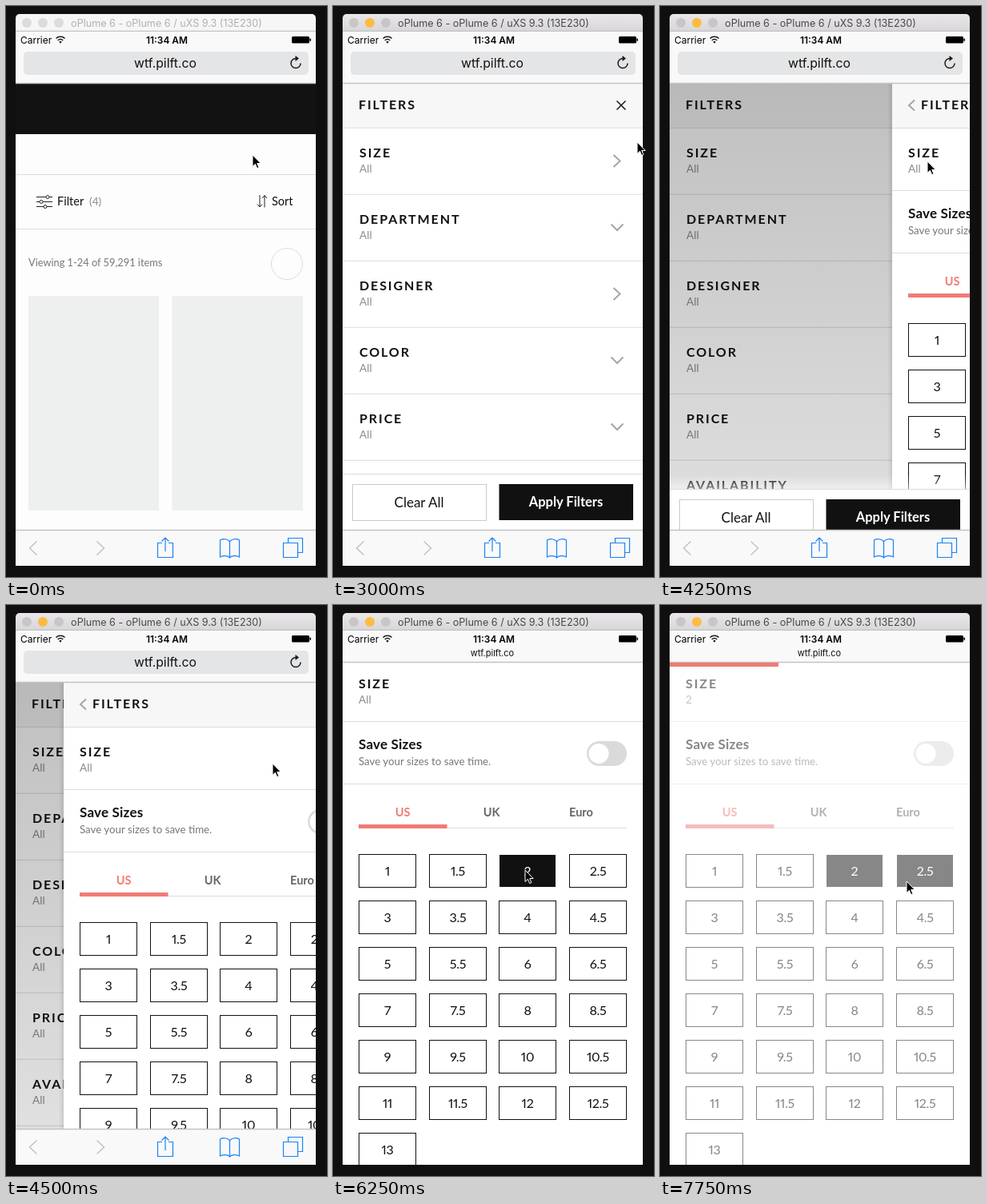
Animation, 401 px wide and 713 px high, one loop 8 s. Source, as an HTML page:

```html
<!DOCTYPE html>
<html lang="en">
<head>
<meta charset="utf-8">
<title>Mobile filter flow</title>
<style>
  html, body { margin: 0; width: 100%; height: 100%; overflow: hidden; background: #100f0f; }
  svg { display: block; width: 100vw; height: 100vh; }
  text { font: 14.5px Lato, "Open Sans", sans-serif; fill: #111; white-space: pre; }
  .ui { font-family: Inter, Roboto, sans-serif; }
  .mid { text-anchor: middle; }
  .title { font-size: 12.6px; }
  .status { font-size: 12px; fill: #000; }
  .clock { font-size: 11.9px; font-weight: 600; }
  .head { font-size: 16px; font-weight: 700; letter-spacing: 1.9px; }
  .value { font-size: 13.6px; fill: #8a8a8a; }
  .count { font-size: 12.8px; fill: #777; }
  .strong { font-size: 17px; font-weight: 700; letter-spacing: .2px; }
  .note { font-size: 13.3px; fill: #777; }
  .tab { font-weight: 700; fill: #666; }
  .cell { font-size: 16px; font-variant-numeric: proportional-nums; letter-spacing: -.3px; }
  .button { font-size: 17px; }
  .apply { font-size: 16.5px; font-weight: 700; fill: #fff; }
  .line { fill: none; stroke-linejoin: miter; }
  .rule { stroke: #dcdcdc; }
  .soft { stroke: #a6a6a6; stroke-width: 2; }
  .dark { stroke: #1a1a1a; stroke-width: 1.5; }
  .thin { stroke: #222; stroke-width: 1; }
  .blue { stroke: #1b82f6; stroke-width: 1.2; }
  .off { stroke: #c3c3c5; stroke-width: 1.5; }
  .picked rect { fill: #111; stroke: #fff; }
  .picked text { fill: #fff; }
</style>
</head>
<body>
<svg id="stage" viewBox="0 0 401 713"></svg>
<script>
const CORAL = '#f07b76';
const LOOP = 8000, TICK = 250, SCROLL_END = 85;

const text = (x, y, str, cls = '', attrs = '') =>
  `<text x="${x}" y="${y}" class="${cls}" ${attrs}>${str}</text>`;
const path = (d, cls, attrs = '') => `<path d="${d}" class="line ${cls}" ${attrs}/>`;
const rect = (x, y, w, h, fill, attrs = '') =>
  `<rect x="${x}" y="${y}" width="${w}" height="${h}" fill="${fill}" ${attrs}/>`;
const rule = (y, x1 = 12, x2 = 387) => path(`M${x1} ${y}H${x2}`, 'rule');
const group = (id, inner, attrs = '') => `<g id="${id}" ${attrs}>${inner}</g>`;
const closeIcon = path('M354.5 118.5l11 11m0-11l-11 11', 'dark');

function listing() {
  const slider = (y, x) =>
    path(`M38 ${y}H${x - 2}M${x + 2} ${y}H58`, 'thin') +
    `<circle cx="${x}" cy="${y}" r="2" class="line thin"/>`;
  return rect(12, 96, 375, 64, '#121212') +
    rect(12, 160, 375, 540, '#fdfdfd') +
    rule(210.5) + rule(278.5) +
    slider(238.5, 52) + slider(244.5, 44) + slider(250.5, 49) +
    text(64, 249, 'Filter') + text(104, 249, '(4)', 'value') +
    path('M317 236v15m-3-3.5l3 3.5 3-3.5M323 251.5v-15m-3 3.5l3-3.5 3 3.5', 'thin') +
    text(332, 249, 'Sort') +
    text(28, 324.5, 'Viewing 1-24 of 59,291 items', 'count') +
    '<circle cx="351" cy="322" r="19.5" class="line rule"/>' +
    rect(28, 362, 163, 268, '#eeefef') + rect(207.5, 362, 163.5, 268, '#eeefef');
}

function filterSheet() {
  const names = ['SIZE', 'DEPARTMENT', 'DESIGNER', 'COLOR', 'PRICE', 'AVAILABILITY', 'SALE'];
  const rows = names.map((name, i) => {
    const y = 152 + 83 * i;
    const chevron = i === 0 || i === 2
      ? `M350.5 ${y + 34}l8 7.5-8 7.5`
      : `M347.5 ${y + 37.5}l7.5 7.5 7.5-7.5`;
    return rule(y + .25) + text(33, y + 36.5, name, 'head') +
      text(33, y + 55.5, 'All', 'value') + path(chevron, 'soft');
  }).join('');
  return rect(12, 96, 375, 640, '#fff') + rect(12, 96, 375, 56, '#f7f7f7') +
    text(32, 129, 'FILTERS', 'head') + closeIcon + rows;
}

function sizePanel() {
  const cells = Array.from({ length: 25 }, (_, i) => {
    const x = 32.5 + Math.round(87.7 * (i % 4)), y = 396.5 + 58 * Math.floor(i / 4);
    return group('cell' + i,
      rect(x, y, 71, 41, '#fff', 'stroke="#111"') +
      text(x + 35.5, y + 26, 1 + i / 2, 'cell mid'));
  }).join('');
  const body = rect(12, 96, 375, 56, '#f7f7f7') +
    path('M40 117.5l-7 6.5 7 6.5', 'soft') +
    text(48, 129, 'FILTERS', 'head') + closeIcon + rule(152.5) +
    text(32, 188.5, 'SIZE', 'head') + text(32, 207.5, 'All', 'value', 'id="chosen"') + rule(230.5) +
    text(32, 264.5, 'Save Sizes', 'strong') +
    text(32, 284.5, 'Save your sizes to save time.', 'note') +
    rect(317, 255, 50, 31, '#dadada', 'rx="15.5"') +
    '<circle cx="332" cy="270.5" r="12.5" fill="#fff"/>' + rule(308.5) +
    text(87, 348.5, 'US', 'tab mid', `style="fill:${CORAL}"`) +
    text(198, 348.5, 'UK', 'tab mid') + text(310, 348.5, 'Euro', 'tab mid') +
    rule(363.5, 32, 367) + rect(32, 359, 110.5, 5, CORAL) + cells;
  return rect(6, 60, 6, 660, 'url(#edge)') + rect(12, 60, 375, 660, '#fff') +
    group('sizeScroll', body);
}

const actionBar = () =>
  rect(12, 566, 375, 18, 'url(#fade)') + rect(12, 584, 375, 140, '#fff') + rule(584.5) +
  rect(24.5, 597.5, 167, 45, '#fff', 'stroke="#cacaca"') +
  text(107.5, 626, 'Clear All', 'button mid') +
  rect(207.5, 597, 167.5, 45, '#111') + text(291, 625, 'Apply Filters', 'apply mid');

const toolbar = () =>
  rect(12, 654, 375, 46, '#f9f9fa') + path('M12 654.5H387', 'off') +
  path('M38.5 668.5l-9 8.5 9 8.5M113.5 668.5l9 8.5-9 8.5', 'off') +
  path('M195 670.5h-5.5v18h19v-18H203M199 681v-17m-4.5 4.5l4.5-4.5 4.5 4.5', 'blue') +
  path('M279.5 669c-2-4-9-4-12-2v21c4-2 10-2 12 1c2-3 8-3 12-1v-21c-3-2-10-2-12 2v20', 'blue') +
  path('M346.5 670.5h18v18h-18zM352.5 670.5v-6h18v18h-6', 'blue');

const browserTop = () =>
  rect(12, 32, 375, 64, '#f9f9f9', 'id="navBack"') +
  path('M12 0H387', 'off', 'id="navLine"') +
  group('pill',
    rect(22, 57, 356, 29, '#e4e5e7', 'rx="5"') +
    path('M368 71.5a6 6 0 1 1-6-6', 'dark') +
    '<path d="M361.5 62l4.5 3.5-4.5 3.5z" fill="#1a1a1a"/>') +
  text(199, 77, 'wtf.pilft.co', 'ui mid', 'id="address"') +
  text(18, 46.5, 'Carrier', 'ui status') + text(201, 46.5, '11:34 AM', 'ui status clock mid') +
  path('M62.5 40.5a8 8 0 0 1 11 0M64.7 43a5 5 0 0 1 6.6 0', 'dark') +
  '<path d="M66.3 44.8a2.5 2.5 0 0 1 3.4 0L68 46.7z"/>' +
  rect(357, 38, 22, 8.5, '#000', 'rx="1.5"') + rect(379.5, 40.5, 1.5, 3.5, '#000', 'rx=".7"');

const titleBar = () =>
  rect(0, 0, 401, 32, '#100f0f') +
  rect(12, 10, 375, 30, '#f6f6f6', 'rx="5" id="titleBack"') +
  [26, 46, 66].map((x, i) => `<circle id="light${i}" cx="${x}" cy="21" r="6"/>`).join('') +
  text(200.5, 25.5, 'oPlume 6 - oPlume 6 / uXS 9.3 (13E230)', 'ui title mid', 'id="titleText"') +
  path('M12 31.5H387', 'off');

const gradient = (id, from, to, attrs) =>
  `<linearGradient id="${id}" ${attrs}><stop stop-color="${from}"/><stop offset="1" stop-color="${to}"/></linearGradient>`;
const down = 'x2="0" y2="1"';

const stage = document.getElementById('stage');
stage.innerHTML = '<defs>' +
  gradient('bar', '#e9e7e9', '#d1cfd1', down) +
  gradient('shade', 'rgba(0,0,0,.25)', 'rgba(0,0,0,.12)', down) +
  gradient('fade', 'rgba(255,255,255,0)', 'rgba(255,255,255,.5)', down) +
  gradient('edge', 'rgba(0,0,0,0)', 'rgba(0,0,0,.1)', '') +
  '<clipPath id="screen"><rect x="12" y="10" width="375" height="689"/></clipPath></defs>' +
  rect(0, 0, 401, 713, '#100f0f') +
  '<g clip-path="url(#screen)">' + listing() +
  group('sheet', filterSheet()) +
  rect(12, 96, 375, 560, 'url(#shade)', 'id="dim"') +
  group('sizes', sizePanel()) + group('actions', actionBar()) +
  group('tools', toolbar()) + titleBar() + browserTop() +
  rect(12, 72, 0, 5, CORAL, 'id="progress"') + '</g>' +
  '<path id="cursor" d="M0 0V14.5L3.4 11.3 5.6 16.6 7.9 15.7 5.7 10.5H10.2Z" fill="#000" stroke="#fff"/>';

const el = id => document.getElementById(id);
const set = (id, attrs) => {
  for (const [key, value] of Object.entries(attrs)) el(id).setAttribute(key, value);
};
const shift = (id, x, y) => set(id, { transform: `translate(${x} ${y})` });
const mix = (a, b, k) => a + (b - a) * k;

// Linear interpolation over [time, ...values] keys, held outside their range.
function at(keys, t) {
  const next = keys.findIndex(key => key[0] > t);
  if (next < 0) return keys[keys.length - 1].slice(1);
  if (next === 0) return keys[0].slice(1);
  const a = keys[next - 1], b = keys[next];
  const k = (t - a[0]) / (b[0] - a[0]);
  return a.slice(1).map((value, i) => mix(value, b[i + 1], k));
}

const tracks = {
  cursor: [[0, 308, 186], [250, 270, 195], [750, 90, 242], [1000, 42, 252], [1500, 34, 256],
    [1750, 40, 257], [2500, 253, 258], [2750, 330, 205], [3000, 380, 170], [3250, 366, 140],
    [3500, 348, 178], [3750, 336, 192], [4250, 334, 194], [4500, 333, 198], [5000, 300, 300],
    [5250, 272, 352], [5500, 265, 367], [5750, 260, 368], [6000, 243, 338], [6250, 240, 331],
    [7250, 240, 331], [7500, 305, 343], [7750, 308, 345]],
  sheet: [[1000, 610], [1250, 330], [1500, 23], [1750, 0]],
  actions: [[1500, 160], [1750, 40], [2000, 6], [2250, 0], [3750, 0], [4000, 4], [4250, 19], [4500, 160]],
  sizes: [[3750, 385], [4000, 355], [4250, 278], [4500, 60], [4750, 8], [5000, 0]],
  dim: [[3750, 0], [4000, .4], [4250, 1]],
  scroll: [[5500, 0], [5750, 32], [6000, SCROLL_END]],
  fade: [[6250, 1], [6500, .5], [6750, .5], [7000, 1], [7500, 1], [7750, .5]],
  progress: [[6250, 0], [6500, 136], [6750, 330], [7000, 0], [7500, 0], [7750, 136]],
};

function draw(t) {
  const value = name => at(tracks[name], t)[0];
  const focused = t >= 1000;
  set('titleBack', { fill: focused ? 'url(#bar)' : '#f6f6f6' });
  el('titleText').style.fill = focused ? '#484848' : '#b0b0b0';
  for (let i = 0; i < 3; i++) {
    const fill = !focused ? '#dcdcdc' : i === 1 ? '#fcbc40' : '#c8c6c8';
    set('light' + i, { fill });
  }

  shift('sheet', 0, value('sheet'));
  shift('actions', 0, value('actions'));
  shift('sizes', value('sizes'), 0);
  set('dim', { opacity: value('dim') });

  const scroll = value('scroll'), collapse = scroll / SCROLL_END;
  shift('sizeScroll', 0, -scroll);
  shift('tools', 0, 46 * collapse);
  set('navBack', { height: mix(64, 39, collapse) });
  shift('navLine', 0, mix(96.5, 71.5, collapse));
  set('pill', { opacity: 1 - collapse });
  set('address', { y: mix(77, 63.5, collapse) });
  el('address').style.fontSize = mix(15.8, 11, collapse) + 'px';

  set('sizeScroll', { opacity: value('fade') });
  set('progress', { width: value('progress') });
  el('chosen').textContent = t >= 7000 ? '2' : 'All';
  el('cell2').classList.toggle('picked', t >= 6250);
  el('cell3').classList.toggle('picked', t >= 7500);

  shift('cursor', ...at(tracks.cursor, t));
}

const start = performance.now();
function tick() {
  const t = (performance.now() - start) % LOOP;
  draw(Math.floor(t / TICK) * TICK);
  requestAnimationFrame(tick);
}
tick();
</script>
</body>
</html>
```
